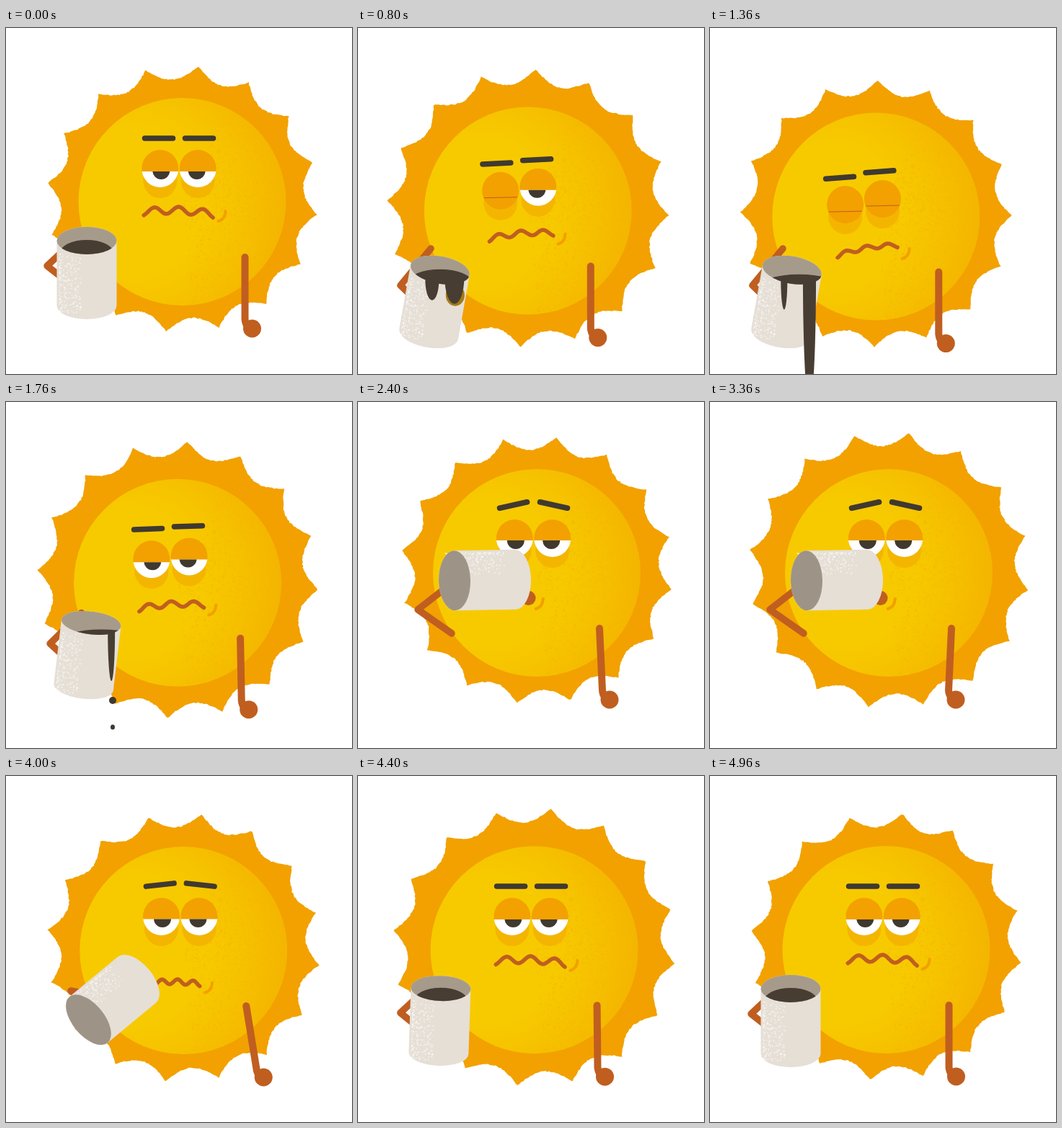
These frames come from a looping animation (480x480 px, 5.04 s). An HTML page with a canvas:

```html
<!DOCTYPE html>
<html>
<head>
<meta charset="utf-8">
<style>
  html, body { margin: 0; width: 100%; height: 100%; overflow: hidden; background: #fff; }
  canvas { display: block; width: 480px; height: 480px; }
</style>
</head>
<body>
<canvas id="stage" width="480" height="480"></canvas>
<script>
const c = document.getElementById('stage').getContext('2d');
const LOOP = 5040, STEP = 80, TAU = Math.PI * 2, DEG = Math.PI / 180;
const RAY = '#f2a100', DARK = '#403930', BROWN = '#c05e20', COFFEE = '#483d33';

function seeded(seed) {
  return () => (seed = (seed * 16807 + 11) % 2147483647) / 2147483647;
}

const random = seeded(73);
const sunGrain = Array.from({ length: 1100 }, () => {
  const a = (random() * 150 - 65) * DEG, r = 142 * Math.sqrt(random());
  return [Math.cos(a) * r, Math.sin(a) * r, 1 + random() * 1.5];
});
const mugGrain = Array.from({ length: 230 }, () => [-39 + 30 * random() ** 1.6, -28 + 82 * random(), 1 + random()]);

// The whole story as a few 0..1 signals that every part is mixed from.
function moodAt(t) {
  const ease = (from, to) => (1 - Math.cos(Math.PI * Math.min(1, Math.max(0, (t - from) / (to - from))))) / 2;
  const sip = ease(1680, 2360) - ease(3520, 4480);
  const wake = ease(1640, 1720);
  return {
    t, sip,
    arc: 4 * sip * (1 - sip),
    doze: 0.6 * ease(0, 640) + 0.4 * ease(1120, 1400) - 0.55 * ease(1640, 1760) - 0.45 * ease(1760, 2160),
    slump: ease(200, 800) - 0.7 * ease(1640, 1760) - 0.3 * ease(1760, 2080),
    shut: [ease(480, 760) - wake, ease(840, 1040) - wake],
    drip: ease(600, 800) - ease(1800, 2000),
    dry: ease(1000, 1700),
    pour: ease(880, 1200) - 0.76 * ease(1560, 1760) - 0.24 * ease(1760, 2000),
    spilled: ease(800, 1680) - ease(2400, 3000)
  };
}

function ellipse(x, y, rx, ry, color, from = 0, to = TAU) {
  c.beginPath();
  c.ellipse(x, y, rx, Math.max(ry, 0), 0, from, to);
  c.fillStyle = color;
  c.fill();
}

function stroke(width, color) {
  c.lineWidth = width;
  c.strokeStyle = color;
  c.stroke();
}

function line(points, width, color) {
  c.beginPath();
  points.forEach(([x, y]) => c.lineTo(x, y));
  stroke(width, color);
}

function grain(dots, color) {
  c.fillStyle = color;
  dots.forEach(([x, y, s]) => c.fillRect(x, y, s, s));
}

function placed(x, y, degrees, draw) {
  c.save();
  c.translate(x, y);
  c.rotate(degrees * DEG);
  draw();
  c.restore();
}

function drawSun(t, x) {
  const radius = 192.3 - 4.3 * Math.cos(TAU * (t / 1260 - 0.03));
  const turn = 6.6 + (x - 244) * 0.43, rough = seeded(t + 19);
  c.beginPath();
  for (let i = 0; i < 480; i++) {
    const u = Math.abs((i / 30) % 1 - 0.5) * 2;
    const r = radius * (0.895 + 0.105 * u * u) + rough() * 1.6 - 0.8;
    const a = (turn - 90 + i * 0.75) * DEG;
    c.lineTo(Math.cos(a) * r, Math.sin(a) * r * 0.985 - 4);
  }
  c.fillStyle = RAY;
  c.fill();
  const shade = c.createRadialGradient(-70, 0, 100, -60, 0, 208);
  shade.addColorStop(0, '#f7ca00');
  shade.addColorStop(0.45, '#f6c200');
  shade.addColorStop(1, '#f4b400');
  ellipse(0, 0, 144, 144, shade);
  grain(sunGrain, 'rgba(244,182,0,.45)');
}

function drawEye(side, lid) {
  ellipse(0, 17, 23.5, 24, '#f4b500');
  ellipse(0, 0, 25.5, 26, RAY);
  if (lid > 24) {
    line([[-23, 10], [23, 9]], 1, BROWN);
    return;
  }
  c.save();
  c.beginPath();
  c.rect(-27, lid, 54, 30);
  c.clip();
  ellipse(0, 0, 25.5, 26, '#fff');
  ellipse(-side * 1.5, 3, 12, 12, DARK);
  c.restore();
}

function drawFace({ doze, sip, shut }) {
  const tilt = -9 * doze;
  placed(-4.5 - 12.5 * doze, -46 + 26 * doze - 2 * sip, tilt, () => [-1, 1].forEach((side, i) => {
    placed(side * 26.2, 0, -tilt, () => drawEye(side, 4 - sip + 23 * shut[i]));
    placed(side * 28, 4 * shut[0] - 42 - 4 * sip, side * 12.5 * sip - tilt / 2,
      () => line([[-19.5, 0], [19.5, 0]], 7.5, DARK));
  }));
}

function drawMouth({ doze, sip, arc }) {
  const half = 48 - 45 * sip ** 1.4 - 6 * doze;
  const wave = Math.min(1, half / 44) * (5 - 2 * doze);
  const x = -5 - 8 * doze - 6.5 * sip, y = 12 + 32 * doze + 23 * sip + 20 * arc;
  const lip = 10 * Math.max(0, sip * 2 - 1);
  placed(x, y, 2 - 12 * doze, () => {
    ellipse(0, 0, lip, lip, BROWN);
    line(Array.from({ length: 41 }, (_, i) => {
      const u = i / 20 - 1;
      return [u * half, 4 * (1 - sip) * u * u - wave * Math.cos(u * Math.PI * 2.85)];
    }), 5.5, BROWN);
  });
  c.beginPath();
  c.moveTo(x + half + 7, y + 15);
  c.quadraticCurveTo(x + half + 17, y + 12, x + half + 17, y + 1);
  stroke(4, RAY);
}

function drawArms({ t, sip, arc, slump }, x, y) {
  const sx = x + 87, sy = y + 77;
  const hand = 10 + 13 * arc + 4 * sip * Math.cos(TAU * (t - 2400) / 1920);
  c.beginPath();
  c.moveTo(sx, sy);
  c.lineTo(sx + hand - 10, sy + 86);
  c.quadraticCurveTo(sx + hand - 9, sy + 97, sx + hand, sy + 99);
  stroke(10, BROWN);
  ellipse(sx + hand, sy + 99, 12.5, 12.5, BROWN);
  line([
    [105 + 25 * sip - 4 * slump, 285 + 36 * sip + 21 * slump],
    [57 + 26 * sip + 20 * arc + 2 * slump, 330 - 42 * sip - 11 * arc + 27 * slump],
    [85 + 34 * sip, 352 - 92 * sip + 30 * slump]
  ], 9.5, BROWN);
}

function drawMug({ sip, arc, slump, spilled }) {
  const x = 112 + 64 * sip + 4 * arc - 6 * slump;
  const y = 340 - 93 * sip + 17 * arc + 40 * slump;
  const turn = 89 * sip + 6 * arc + 10 * slump;
  const depth = 19 - 41 * Math.min(1, sip / 0.45); // negative shows the base
  const ry = Math.abs(depth), half = 45 - 3 * sip;
  placed(x, y, turn, () => {
    c.beginPath();
    c.ellipse(0, half, 41.5, ry, 0, 0, Math.PI);
    c.ellipse(0, -half, 41.5, ry, 0, Math.PI, TAU);
    c.fillStyle = '#e6dfd6';
    c.fill();
    grain(mugGrain, 'rgba(255,255,255,.6)');
    if (depth < 0) {
      ellipse(0, half, 41.5, ry, '#9e9387');
      return;
    }
    ellipse(0, -half, 41.5, ry, '#a69b8b');
    c.clip();
    placed(0, -half, -turn, () =>
      ellipse(14 * spilled, 17 + 10 * spilled, 37 + 7 * slump + 20 * spilled, 18, COFFEE));
  });
  return [x + half * Math.sin(turn * DEG), y - half * Math.cos(turn * DEG)];
}

function drawSpill({ t, drip, dry, pour }, rimX, rimY) {
  const runDown = (x, y, width, length) => ellipse(rimX + x, rimY + y, width / 2, length, COFFEE, 0, Math.PI);
  if (drip > 0.5 && dry === 0) ellipse(rimX + 21, rimY + 35, 13, 15, '#a17c18');
  runDown(-11, 14, 19 * drip * (1 - dry), 28 * drip + 25 * dry);
  runDown(20 + 8 * dry, 11, 27 * drip * (1 - 0.63 * dry), 36 * drip + 140 * pour);
  if (t >= 1760 && t < 2160) {
    const fall = (t - 1760) * 0.22;
    ellipse(148, 414 + fall, 5, 5, DARK);
    ellipse(148, 451 + fall, 3, 3.5, DARK);
  }
}

function render(now) {
  const t = Math.floor(now % LOOP / STEP) * STEP, mood = moodAt(t);
  const x = 244.5 - 14.5 * mood.doze + 3.5 * mood.sip;
  const y = 241 + 21 * mood.doze - 4 * mood.sip + 3 * mood.arc;
  c.clearRect(0, 0, 480, 480);
  c.lineCap = c.lineJoin = 'round';
  placed(x, y, 0, () => {
    drawSun(t, x);
    drawFace(mood);
    drawMouth(mood);
  });
  drawArms(mood, x, y);
  drawSpill(mood, ...drawMug(mood));
}

const start = performance.now();
function frame() {
  render(performance.now() - start);
  requestAnimationFrame(frame);
}
frame();
</script>
</body>
</html>
```
